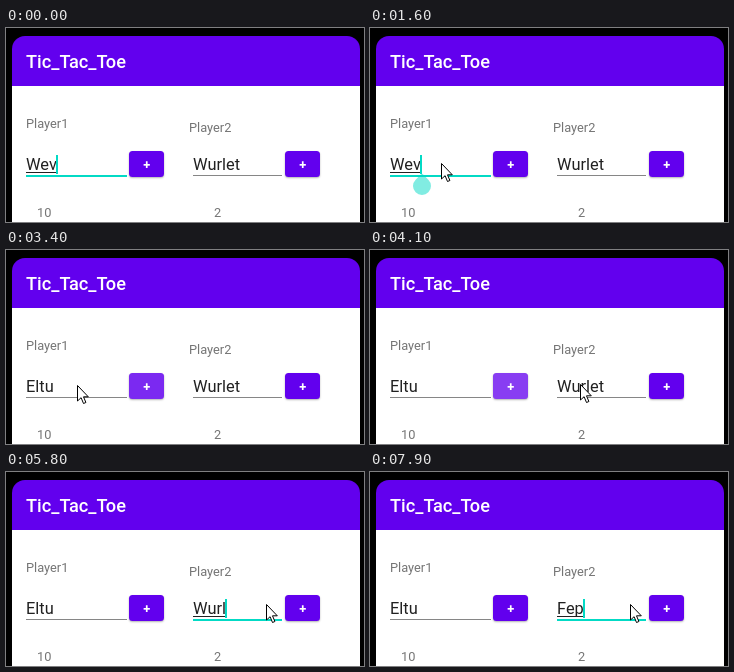
An HTML page with a canvas that plays this animation: 358 px wide and 194 px high, repeating every 8 s.

```html
<!DOCTYPE html>
<html lang="en">
<head>
<meta charset="utf-8">
<title>Tic_Tac_Toe</title>
<style>
  html, body { margin: 0; width: 100%; height: 100%; overflow: hidden; background: #000; }
  canvas { display: block; width: 358px; height: 194px; }
</style>
</head>
<body>
<canvas></canvas>
<script>
const LOOP = 8000, STEP = 100;
const PURPLE = '#6200ee', TEAL = '#03dac5', GREY = '#757575', INK = '#212121';
const canvas = document.querySelector('canvas');
const ctx = canvas.getContext('2d');
const ratio = window.devicePixelRatio || 1;
canvas.width = 358 * ratio;
canvas.height = 194 * ratio;

// Typed entries: [time, text, underlined while composing]
const first = {
  x: 20, right: 121, focus: [0, 3300],
  typed: [[0, 'Wev', 1], [1700, 'We', 1], [1900, '', 0], [2500, 'E', 0],
    [2700, 'El', 1], [2800, 'Elt', 1], [2900, 'Eltu', 1], [3300, 'Eltu', 0]]
};
const second = {
  x: 187, right: 276, focus: [4300, LOOP],
  typed: [[0, 'Wurlet', 0], [5200, 'Wurlet', 1], [5800, 'Wurl', 1], [6300, 'Wu', 1],
    [6500, 'W', 1], [6600, 'W', 0], [6800, '', 0], [7400, 'F', 0], [7700, 'Fe', 1], [7900, 'Fep', 1]]
};
const caretGaps = [[500, 1000], [5100, 5200], [7300, 7400]];

// Keyframes: [time, values...]
const pointerPath = [[200, 43, 78], [600, 71, 135], [3700, 71, 135], [3800, 150, 138],
  [3900, 206, 139], [4000, 206, 139], [4100, 210, 134], [4300, 210, 134], [4600, 260, 132]];
const highlight = [[3200, 0], [3500, 0.24], [4100, 0.24], [4300, 0]];
const firstHandle = [[900, 0], [1000, 0.86], [1200, 1], [1500, 1], [1600, 0.5], [1700, 0]];
const secondHandle = [[4800, 0], [4900, 1], [5500, 1], [5600, 0.5], [5700, 0.5], [5800, 0]];

const within = (t, [from, to]) => t >= from && t < to;

function valueAt(keys, t) {
  const next = keys.findIndex(key => key[0] > t);
  if (next === 0) return keys[0].slice(1);
  if (next < 0) return keys[keys.length - 1].slice(1);
  const a = keys[next - 1], b = keys[next];
  const p = (t - a[0]) / (b[0] - a[0]);
  return a.slice(1).map((v, i) => v + (b[i + 1] - v) * p);
}

function rect(x, y, w, h, color) {
  ctx.fillStyle = color;
  ctx.fillRect(x, y, w, h);
}

function rounded(x, y, w, h, radii, color) {
  ctx.fillStyle = color;
  ctx.beginPath();
  ctx.roundRect(x, y, w, h, radii);
  ctx.fill();
}

function label(text, x, y, size, color, weight = 400) {
  ctx.font = `${weight} ${size}px Roboto, sans-serif`;
  ctx.fillStyle = color;
  ctx.fillText(text, x, y);
  return ctx.measureText(text).width;
}

function field({ x, right, focus, typed }, t) {
  const [, text, composing] = typed.findLast(entry => entry[0] <= t);
  const focused = within(t, focus);
  if (focused) rect(x, 147, right - x, 2, TEAL);
  else rect(x, 147, right - x, 1, '#868686');
  const width = label(text, x, 142, 16.4, INK);
  if (composing) rect(x, 144, width, 1, INK);
  if (focused && !caretGaps.some(gap => within(t, gap))) {
    rect(Math.round(x + width - 0.6), 127, 2, 19, TEAL);
  }
}

function button(x, glow) {
  ctx.save();
  ctx.shadowColor = 'rgba(0,0,0,.3)';
  ctx.shadowBlur = 2 * ratio;
  ctx.shadowOffsetY = ratio;
  rounded(x, 123, 35, 26, 3.5, PURPLE);
  ctx.restore();
  if (glow) rounded(x, 123, 35, 26, 3.5, `rgba(255,255,255,${glow})`);
  ctx.textAlign = 'center';
  label('+', x + 17.8, 141, 12.8, '#fff', 700);
  ctx.textAlign = 'left';
}

function handle(x, alpha) {
  if (!alpha) return;
  ctx.save();
  ctx.globalAlpha = alpha;
  ctx.translate(x, 158);
  ctx.rotate(Math.PI / 4);
  rounded(-9, -9, 18, 18, [1, 9, 9, 9], TEAL);
  ctx.restore();
}

function pointer(x, y) {
  ctx.save();
  ctx.translate(x + 0.5, y + 0.5);
  const arrow = new Path2D('M0 0V15.5L3.6 12.2L6 18L8.4 17L6 11.3H10.8Z');
  ctx.fillStyle = '#fff';
  ctx.fill(arrow);
  ctx.strokeStyle = '#000';
  ctx.lineWidth = 1;
  ctx.stroke(arrow);
  ctx.restore();
}

function draw(t) {
  ctx.setTransform(ratio, 0, 0, ratio, 0, 0);
  rect(0, 0, 358, 194, '#000');
  rounded(6, 8, 348, 50, [13, 13, 0, 0], PURPLE);
  rect(6, 58, 348, 136, '#fff');
  label('Tic_Tac_Toe', 20, 40, 18.2, '#fff', 500);
  label('Player1', 20, 100, 12.8, GREY);
  label('Player2', 183, 103.5, 12.8, GREY);
  label('10', 31, 188.5, 12.8, GREY);
  label('2', 208, 188.5, 12.8, GREY);
  field(first, t);
  field(second, t);
  button(123, valueAt(highlight, t)[0]);
  button(279, 0);
  handle(52, valueAt(firstHandle, t)[0]);
  handle(234, valueAt(secondHandle, t)[0]);
  if (t >= pointerPath[0][0]) pointer(...valueAt(pointerPath, t).map(Math.round));
}

const start = performance.now();
function tick() {
  const t = (performance.now() - start) % LOOP;
  draw(Math.floor(t / STEP) * STEP);
  requestAnimationFrame(tick);
}
tick();
</script>
</body>
</html>
```
